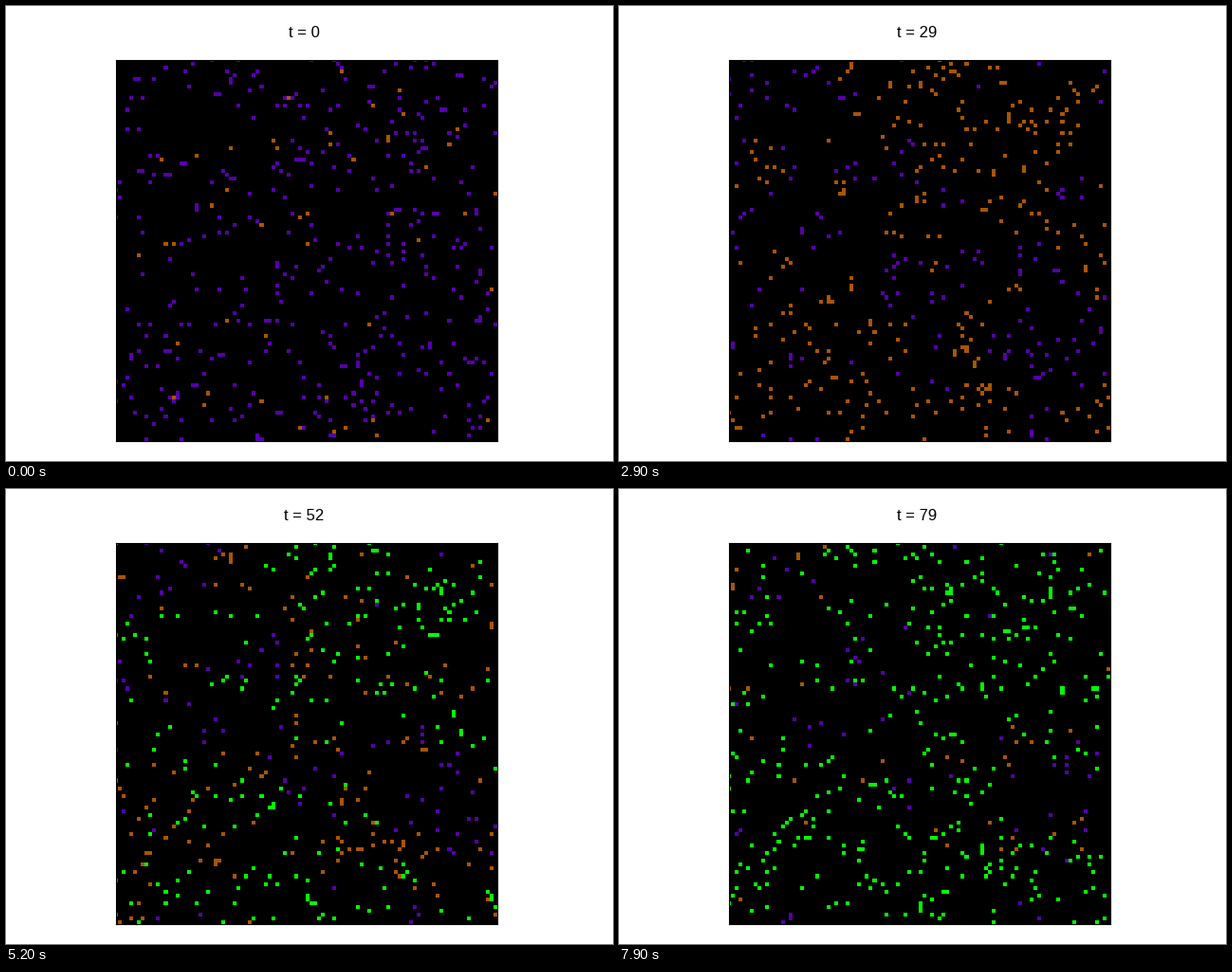
A matplotlib script for the animation above (8 s loop, 640x480 px).

```python
import numpy as np
import matplotlib.pyplot as plt
from matplotlib.animation import FuncAnimation
from matplotlib.colors import ListedColormap

W, H, DPI = 640, 480, 100
SIZE, PEOPLE, STEPS = 100, 430, 80
SICK_TIME = 33
EMPTY, SUSCEPTIBLE, INFECTED, RECOVERED = range(4)
COLORS = ["#000000", "#5500aa", "#aa5500", "#00ff00"]

# Cumulative number of infections over time
CASE_T = [0, 6, 12, 20, 29, 37, 45, 59, 68, 79]
CASE_N = [47, 92, 135, 212, 283, 318, 338, 365, 373, 379]

rng = np.random.default_rng(12)


def inside(pos, x0, x1, y0, y1):
    x, y = pos.T
    return (x >= x0) & (x <= x1) & (y >= y0) & (y <= y1)


def populate():
    pos = rng.integers(0, SIZE, (2 * PEOPLE, 2))
    pos = pos[~inside(pos, 8, 23, 8, 24)][:PEOPLE]
    caught = np.full(PEOPLE, np.inf)
    # The lower right starts out free of infection
    open_area = np.flatnonzero(~inside(pos, 68, 96, 58, 96))
    caught[rng.choice(open_area, CASE_N[0], replace=False)] = 0
    return pos, caught


def status(caught, t):
    state = np.full(PEOPLE, SUSCEPTIBLE)
    state[caught <= t] = INFECTED
    state[caught + SICK_TIME <= t] = RECOVERED
    return state


def spread(pos, caught, t):
    """Infect the susceptible walkers closest to a sick one."""
    state = status(caught, t)
    healthy = np.flatnonzero(state == SUSCEPTIBLE)
    sick = pos[state == INFECTED]
    gap = np.abs(pos[healthy, None] - sick[None])
    gap = np.minimum(gap, SIZE - gap)
    nearest = np.hypot(gap[..., 0], gap[..., 1]).min(axis=1)
    nearest += rng.random(len(healthy))
    new = int(round(np.interp(t, CASE_T, CASE_N))) - np.isfinite(caught).sum()
    caught[healthy[np.argsort(nearest)[:new]]] = t


def snapshot(pos, state):
    grid = np.full((SIZE, SIZE), EMPTY)
    for kind in (SUSCEPTIBLE, INFECTED, RECOVERED):
        x, y = pos[state == kind].T
        grid[y, x] = kind
    return grid


def simulate():
    pos, caught = populate()
    grids = [snapshot(pos, status(caught, 0))]
    for t in range(1, STEPS):
        pos = (pos + rng.integers(-1, 2, pos.shape)) % SIZE
        spread(pos, caught, t)
        grids.append(snapshot(pos, status(caught, t)))
    return grids


grids = simulate()

fig = plt.figure(figsize=(W / DPI, H / DPI), dpi=DPI, facecolor="white")
ax = fig.add_axes([116 / W, 21 / H, 402 / W, 402 / H], facecolor="black")
image = ax.imshow(grids[0], cmap=ListedColormap(COLORS), vmin=0, vmax=3,
                  interpolation="nearest", aspect="auto")
ax.set(xlim=(0, SIZE - 0.5), ylim=(SIZE - 0.5, 0), xticks=[], yticks=[])
title = fig.text(314 / W, 1 - 33 / H, "", ha="center", va="baseline",
                 family="Liberation Sans", size=12, color="black")


def update(t):
    image.set_data(grids[t])
    title.set_text(f"t = {t}")
    return image, title


anim = FuncAnimation(fig, update, frames=STEPS, interval=100,
                     repeat=True, repeat_delay=0)
plt.show()
```
